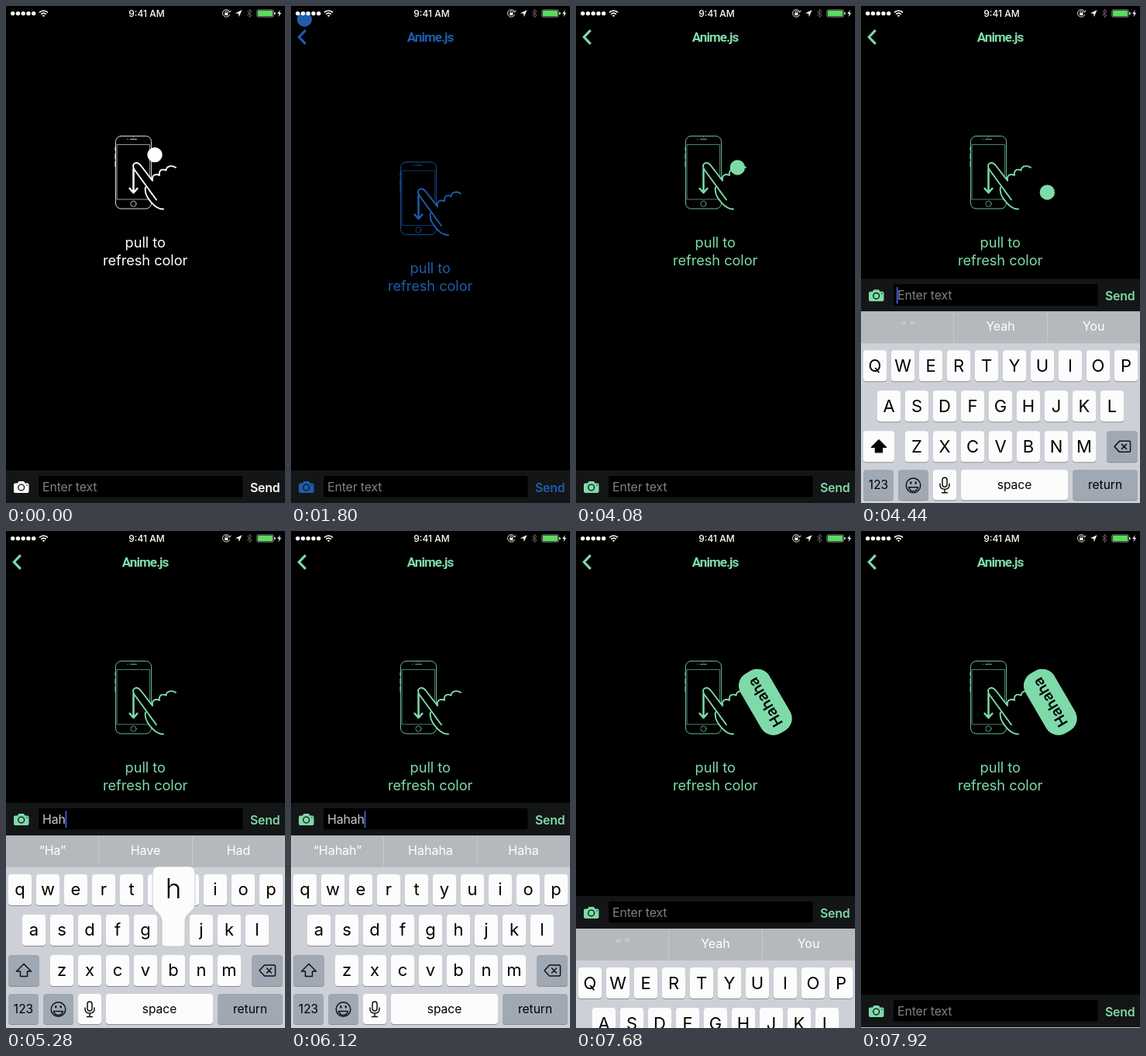
An HTML page for the animation above (8 s loop, 360 px wide and 640 px high).

```html
<!DOCTYPE html>
<html lang="en">
<head>
<meta charset="utf-8">
<title>Pull to refresh color</title>
<style>
  html, body { margin: 0; width: 100%; height: 100%; overflow: hidden; background: #000; }
  svg { display: block; width: 360px; height: 640px; --c: #fff; }
  text { font-family: Inter, Roboto, sans-serif; }
  .tint { fill: var(--c); }
  .line { fill: none; stroke: var(--c); stroke-linecap: round; stroke-linejoin: round; }
  .mid { text-anchor: middle; }
  .hint { font-size: 18.2px; font-weight: 400; letter-spacing: -.05px; }
  .title { font: 700 17px Roboto, sans-serif; letter-spacing: -.95px; }
  .entry { font-size: 15.9px; letter-spacing: -.15px; }
  .key { font-size: 22px; }
  .small { font-size: 15.5px; }
  .tip { font-size: 16px; fill: #fff; }
  .ink { fill: none; stroke: #111; stroke-width: 1.5; stroke-linejoin: round; stroke-linecap: round; }
</style>
</head>
<body>
<svg id="stage" viewBox="0 0 360 640">
  <rect width="360" height="640"/>

  <g id="head">
    <path class="line" d="M18.8 31.2L10.300 40l8.500 8.800" style="stroke-width:3.1;stroke-linecap:butt;stroke-linejoin:miter"/>
    <text class="tint title mid" x="179.500" y="46">Anime.js</text>
  </g>

  <g id="pull">
    <g class="line" stroke-width="1" stroke-opacity=".85">
      <rect x="141.500" y="167.500" width="46" height="93.500" rx="7"/>
      <rect x="143.500" y="178.500" width="42" height="70.500" stroke-width=".7"/>
      <path d="M160.500 171.700h8M156.800 171.700h.4M164.500 168.900h.1"/>
      <path d="M141 182v4M141 190v7M141 200v7" stroke-width="1.2"/>
      <circle cx="164.500" cy="254.700" r="3.600" stroke-width=".8"/>
    </g>
    <path d="M194 250L165 210Q162 204 167 202Q171 201 174 205L189 225C188 218 193 216 198 218C197 212 201 209 207 212C207 206 213 205 219 208L222 262H203C190 260 183 250 180 234Z"/>
    <g class="line" stroke-width="1.900">
      <path d="M194 249.500L165.500 210.500Q162 204.500 166.500 202.300Q170.500 201 174 205.500L189 225"/>
      <path d="M189 224C188 218 193 215.500 198 218C197 212 201 209 206.500 211.700C207 206 214 204.500 219 208"/>
      <path d="M180 233.500Q178.500 240 183 247Q193 262 203 261.500"/>
      <path d="M164.500 210V240M159.600 235L164.500 240.500L169.400 235" stroke-width="2.500"/>
    </g>
    <text class="tint hint mid" x="179.700" y="311">pull to</text>
    <text class="tint hint mid" x="179.700" y="334">refresh color</text>
  </g>

  <g id="bar">
    <rect y="598" width="360" height="42" fill="#141516"/>
    <rect x="42" y="605" width="263.500" height="27.500" rx="2"/>
    <path class="tint" d="M12 614.500h3l1.500-2.500h6.500l1.500 2.500h3q2 0 2 2v8.500q0 2-2 2H12q-2 0-2-2v-8.500q0-2 2-2z"/>
    <circle cx="19.700" cy="620" r="3.900" fill="none" stroke="#141516" stroke-width="1.400"/>
    <circle cx="27" cy="617" r=".8" fill="#141516"/>
    <text id="entry" class="entry" x="47" y="625">Enter text</text>
    <rect id="caret" y="608.500" width="1.800" height="21.500" fill="#4459e0"/>
    <text class="tint" x="315" y="626" font-size="15.800" font-weight="600" letter-spacing="-.2">Send</text>
  </g>

  <g id="board">
    <rect y="392" width="360" height="248" fill="#cdd1d7"/>
    <rect y="392" width="360" height="41" fill="#b4b9bd"/>
    <path d="M119.500 393v39M240.500 393v39" stroke="#c6cacd"/>
    <text class="tip mid" x="60" y="417"></text>
    <text class="tip mid" x="180" y="417"></text>
    <text class="tip mid" x="300" y="417"></text>
    <g id="keys"></g>
    <path id="shift" class="ink" d="M23 557.500l9.500 9.500h-5v6.500h-9v-6.500h-5z"/>
    <path class="ink" d="M333.500 559H346q1.500 0 1.500 1.500v11q0 1.500-1.500 1.500h-12.500l-6.500-7zM336.500 563l6 6M342.500 563l-6 6"/>
    <g class="ink">
      <circle cx="67.500" cy="616" r="9.300"/>
      <path d="M61.500 618.500h12q-1.500 5-6 5t-6-5z"/>
      <path d="M64.300 612v1.500M70.700 612v1.500" stroke-width="2.200"/>
      <rect x="105" y="606" width="6" height="12" rx="3"/>
      <path d="M102 614v1.500q0 5.500 6 5.500t6-5.500V614M108 621v4.500M104.500 625.500h7"/>
    </g>
    <g id="pop">
      <path d="M-4.500 -62H34.500Q43 -62 43 -53V-15C43 -3 30 -3 30 9V37Q30 41 26 41H4Q0 41 0 37V9C0 -3 -12 -3 -12 -15V-53Q-12 -62 -4.500 -62Z" fill="#fcfcfc" stroke="#b3b7bd" stroke-width=".7"/>
      <text class="mid" x="15" y="-21" font-size="35" font-weight="300"></text>
    </g>
  </g>

  <circle id="ball" class="tint" r="9.700"/>
  <g id="bubble">
    <rect class="tint" x="-44.500" y="-21.500" width="89" height="43" rx="18"/>
    <text class="mid" y="6.500" font-size="19" font-weight="600">Hahaha</text>
  </g>

  <g id="status" fill="#fff">
    <g id="dots"></g>
    <g fill="none" stroke="#fff" stroke-width="1.600">
      <path d="M43 8.300Q48.500 3.700 54 8.300M45.200 10.600Q48.500 7.800 51.800 10.600"/>
    </g>
    <path d="M46.800 12.200Q48.500 10.800 50.200 12.200L48.500 14z"/>
    <text class="mid" x="181.500" y="13.500" font-size="12" font-weight="500">9:41 AM</text>
    <g fill="none" stroke="#fff" stroke-width=".9">
      <path d="M288.500 7.300A4.700 4.700 0 1 0 288.700 11"/>
      <path d="M282.900 8.800v-1a1.400 1.400 0 0 1 2.800 0v1" stroke-width=".8"/>
      <path d="M290.200 5.500l-1.200 2.500-2.500-.8" stroke-width=".8"/>
    </g>
    <rect x="282.200" y="8.700" width="4.200" height="3.300"/>
    <path d="M304.500 5.300L300.700 14l-.6-4.300-4.300-.5z"/>
    <path d="M311 6.500l6 5.500-3 2.700V4.200l3 2.700-6 5.500" fill="none" stroke="#666"/>
    <rect x="323.900" y="5" width="21.200" height="9" rx="1.500" fill="none" stroke="#bbb" stroke-width=".8"/>
    <rect x="325" y="6" width="19" height="7" rx=".6" fill="#57dc5c"/>
    <path d="M346.200 8h1.300v3h-1.300zM353.800 5l-3.600 5h2.300l-1.100 4.300 3.800-5.500h-2.400z"/>
  </g>
</svg>
<script>
const $ = id => document.getElementById(id);
const LOOP = 8000, SPAN = 630, REACH = 192, TURN = 240, RISE = 248;
const BLUE = 1790, GREEN = 3160, LAUNCH = 1815, FLING = 7054;
const WORD = 'Hahaha', TAPS = [4660, 4920, 5200, 5540, 5860, 6180], HOLD = 160, SEND = 6930;
const TIPS = [
  ['“ ”', 'Yeah', 'You'],
  ['“H”', 'Have', 'He'],
  ['“Ha”', 'Have', 'Had'],
  ['“Hah”', 'Haha', 'Hahaha'],
  ['“Haha”', 'Hahaha', 'Haha'],
  ['“Hahah”', 'Hahaha', 'Haha'],
  ['“Hahaha”', 'Hahahaha', 'Haha']
];

function add(parent, tag, attrs, text) {
  const el = document.createElementNS('http://www.w3.org/2000/svg', tag);
  for (const k in attrs) el.setAttribute(k, attrs[k]);
  if (text) el.textContent = text;
  return parent.appendChild(el);
}

for (let i = 0; i < 5; i++) add($('dots'), 'circle', { cx: 8.7 + i * 6.75, cy: 9.6, r: 2.7 });

function keyCap(x, y, w, fill, h = 40) {
  add($('keys'), 'rect', { x, y: y + 1, width: w, height: h, rx: 4, fill: '#898d93' });
  return add($('keys'), 'rect', { x, y, width: w, height: h, rx: 4, fill });
}
const letters = {};
[['qwertyuiop', 3], ['asdfghjkl', 21], ['zxcvbnm', 57]].forEach(([row, left], r) => {
  [...row].forEach((ch, i) => {
    const x = left + i * 36, y = 442 + r * 52;
    keyCap(x, y, 30, '#fcfcfc');
    const label = add($('keys'), 'text', { class: 'key mid', x: x + 15 });
    letters[ch] = { x, y, label };
  });
});
const GRAY = '#a0a8b3';
const shiftCap = keyCap(3, 546, 40, GRAY);
keyCap(317, 546, 40, GRAY);
keyCap(3, 596, 39, GRAY, 39);
keyCap(48, 596, 39, GRAY, 39);
keyCap(93, 596, 30, '#fcfcfc', 39);
keyCap(129, 596, 138, '#fcfcfc', 39);
keyCap(273, 596, 84, GRAY, 39);
[['123', 22.5], ['space', 198], ['return', 315]].forEach(([s, x]) =>
  add($('keys'), 'text', { class: 'small mid', x, y: 621 }, s));

const clamp = u => Math.min(1, Math.max(0, u));
const smooth = (t, a, b) => { const u = clamp((t - a) / (b - a)); return u * u * (3 - 2 * u); };
const settle = (t, a) => 1 - (1 - clamp((t - a) / 400)) ** 4;
const elastic = u => 1 - 2 ** (-10 * u) * Math.cos(4 * Math.PI * u);
const cycle = t => t < 0 ? 0 : elastic((t % SPAN) / SPAN);
const show = (el, on) => el.setAttribute('visibility', on ? 'visible' : 'hidden');
const shiftY = (id, y) => $(id).setAttribute('transform', `translate(0 ${y.toFixed(2)})`);

const tips = document.querySelectorAll('.tip');
const entry = $('entry'), popText = $('pop').querySelector('text');

function drawKeyboard(t) {
  const count = t < SEND ? TAPS.filter(a => a <= t).length : 0;
  const text = WORD.slice(0, count), upper = !count;

  entry.textContent = text || 'Enter text';
  entry.setAttribute('fill', text ? '#c8c8cc' : '#808080');
  $('caret').setAttribute('x', text ? 46.8 + entry.getComputedTextLength() : 45.8);
  show($('caret'), t > 4150 && t < 7620);

  for (const ch in letters) {
    const { y, label } = letters[ch];
    label.textContent = upper ? ch.toUpperCase() : ch;
    label.setAttribute('y', y + (upper ? 28 : 26.5));
  }
  shiftCap.setAttribute('fill', upper ? '#fcfcfc' : GRAY);
  $('shift').style.fill = upper ? '#000' : 'none';

  // Suggestions trail the typing a little.
  const seen = t < SEND ? TAPS.filter(a => a + 130 <= t).length : 0;
  tips.forEach((el, i) => {
    el.textContent = TIPS[seen][i];
    el.style.opacity = !seen && !i ? .4 : 1;
  });

  const last = count - 1, held = count > 0 && t < TAPS[last] + HOLD;
  show($('pop'), held);
  if (held) {
    const k = letters[WORD[last].toLowerCase()];
    $('pop').setAttribute('transform', `translate(${k.x} ${k.y})`);
    popText.textContent = WORD[last];
  }
}

function draw(t) {
  const color = t < BLUE ? '#fff' : t < GREEN ? '#1d5dac' : '#7edba9';
  $('stage').style.setProperty('--c', color);
  show($('head'), t >= BLUE);

  const pull = smooth(t, 1240, 1450) - smooth(t, 1626, 1966)
             + smooth(t, 2430, 2640) - smooth(t, 3000, 3340);
  shiftY('pull', 70 * pull);

  const rise = RISE * (settle(t, 4150) - settle(t, 7620));
  shiftY('bar', -rise);
  shiftY('board', RISE - rise);
  drawKeyboard(t);

  // The ball goes home on the first refresh, then springs out again.
  const d = REACH * cycle(t < BLUE ? t + 68 : t - LAUNCH);
  show($('ball'), t < TAPS[0]);
  $('ball').setAttribute('cx', 17.4 + d);
  $('ball').setAttribute('cy', 17 + d);

  const fly = cycle(t - FLING);
  show($('bubble'), t >= SEND);
  $('bubble').setAttribute('transform',
    `translate(${52.5 + REACH * fly} ${28.5 + REACH * fly}) rotate(${TURN * fly})`);
}

const start = performance.now();
function frame() {
  draw((performance.now() - start) % LOOP);
  requestAnimationFrame(frame);
}
frame();
</script>
</body>
</html>
```
